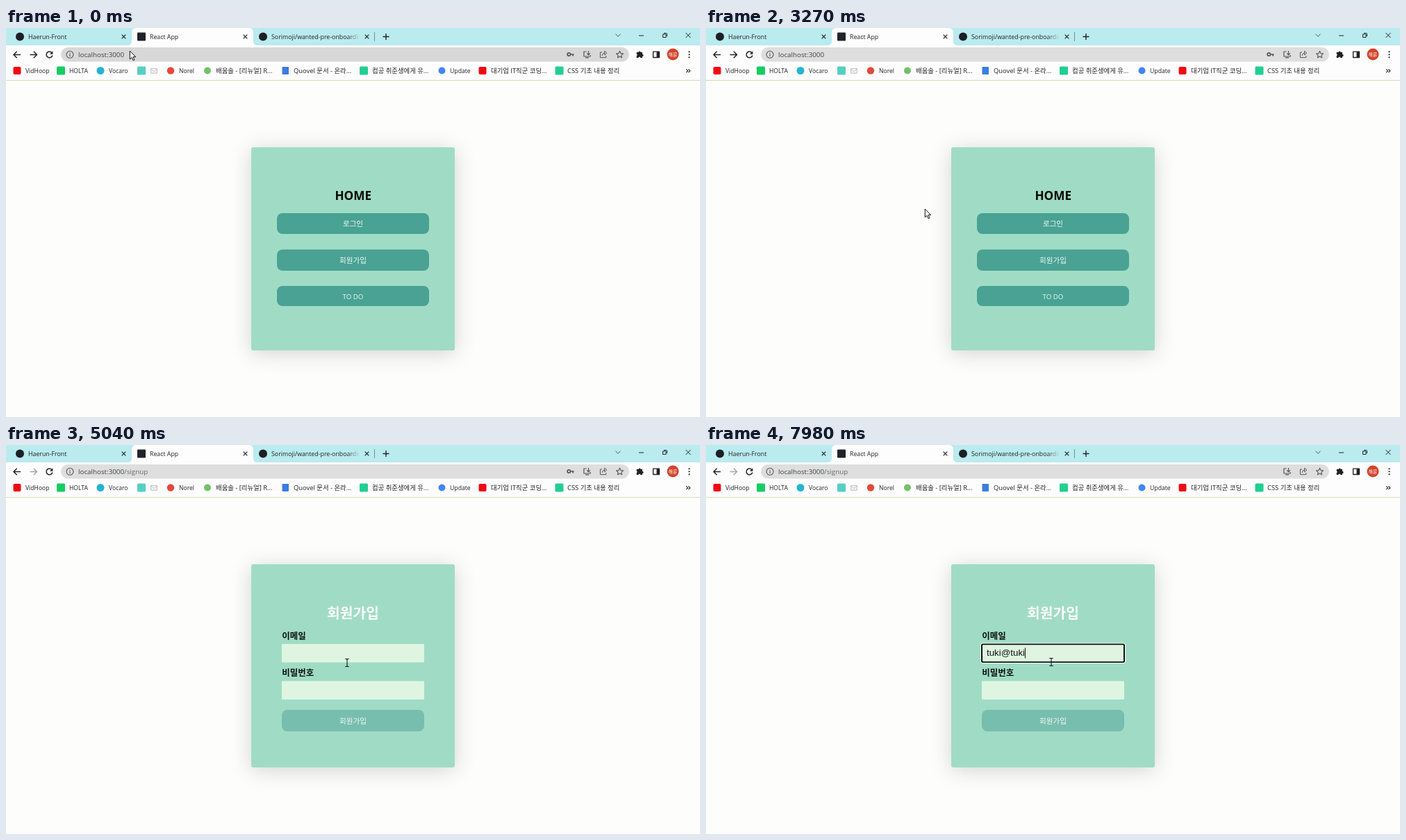
Recreate the animation shown at these times as an HTML page with a canvas. Size 999 by 561 pixels, loop 8000 ms.

```html
<!DOCTYPE html>
<html lang="ko">
<head>
<meta charset="utf-8">
<title>Sign-up flow</title>
<style>
  html, body { margin: 0; width: 100%; height: 100%; overflow: hidden; background: #fdfdfc; }
  canvas { display: block; width: 100vw; height: 100vh; }
</style>
</head>
<body>
<canvas id="stage" width="999" height="561"></canvas>
<script>
const ctx = document.getElementById('stage').getContext('2d');
const LOOP = 8000;
const UI = '"Open Sans", "Noto Sans CJK KR", "Noto Sans CJK", sans-serif';
const KR = '"Noto Sans CJK KR", "Noto Sans CJK", "Open Sans", sans-serif';
const INK = '#222', ICON = '#555';

// Timeline in ms
const SIGNUP_AT = 4810, FOCUS_AT = 5080, KEY_GONE_AT = 6280;
const EMAIL = 'tuki@tuki';
const KEYS = [6560, 6700, 6820, 6940, 7160, 7460, 7580, 7700, 7800];

// Pointer stops: time, x, y
const PATH = [
  [0, 178, 33], [40, 178, 33], [400, 298, 190], [1070, 298, 190], [1100, 300, 192],
  [1540, 300, 192], [1870, 346, 227], [2740, 346, 227], [2810, 314, 260],
  [3240, 314, 260], [3270, 315, 261], [3870, 530, 337], [4040, 530, 337], [4070, 532, 339],
  [4810, 532, 339], [5040, 491, 314], [5180, 497, 313], [8000, 497, 313]
];

const HOME_BUTTONS = [
  { y: 267, h: 30, label: '로그인', size: 10.6 },
  { y: 319.5, h: 30.5, label: '회원가입', size: 10.6 },
  { y: 372, h: 29, label: 'TO DO', size: 9.7 }
];
const FIELDS = [
  { y: 287, label: '이메일', labelY: 279.5 },
  { y: 340.5, label: '비밀번호', labelY: 333.3 }
];

function box(x, y, w, h, color, r = 0) {
  ctx.fillStyle = color;
  ctx.beginPath();
  ctx.roundRect(x, y, w, h, r);
  ctx.fill();
}

function disc(x, y, r, color) {
  ctx.fillStyle = color;
  ctx.beginPath();
  ctx.arc(x, y, r, 0, 7);
  ctx.fill();
}

function text(s, x, y, size, color = INK, { weight = 400, align = 'left', family = UI } = {}) {
  ctx.font = `${weight} ${size}px ${family}`;
  ctx.textAlign = align;
  ctx.fillStyle = color;
  ctx.fillText(s, x, y);
}

// Path given around its own origin, placed at x, y
function shape(d, x, y, { fill, stroke, width = 1.2 }) {
  const p = new Path2D(d);
  ctx.save();
  ctx.translate(x, y);
  ctx.lineJoin = 'round';
  if (fill) { ctx.fillStyle = fill; ctx.fill(p); }
  if (stroke) { ctx.strokeStyle = stroke; ctx.lineWidth = width; ctx.stroke(p); }
  ctx.restore();
}

const cross = (x, y, r, width = 1.2) =>
  shape(`M${-r},${-r}L${r},${r}M${r},${-r}L${-r},${r}`, x, y, { stroke: INK, width });

function tabs() {
  box(0, 0, 999, 25, '#b9ebef');
  box(181, 0, 175, 26, '#fdfdfd', [6, 6, 0, 0]);
  shape('M-6,0Q0,0 0,-6V0Z', 181, 25, { fill: '#fdfdfd' });
  shape('M6,0Q0,0 0,-6V0Z', 356, 25, { fill: '#fdfdfd' });

  disc(20, 12.5, 6, '#1c2024');
  text('Haerun-Front', 32, 15.5, 8.8);
  box(189, 6.5, 12, 12, '#20232a', 1);
  text('React App', 207, 15.5, 8.8);
  disc(370, 12.5, 6, '#1c2024');
  const fade = ctx.createLinearGradient(492, 0, 509, 0);
  fade.addColorStop(0, INK);
  fade.addColorStop(1, '#b9ebef');
  ctx.save();
  ctx.beginPath();
  ctx.rect(380, 0, 129, 25);
  ctx.clip();
  text('Sorimoji/wanted-pre-onboarding', 382, 15.5, 8.8, fade);
  ctx.restore();

  for (const x of [169.5, 344.5, 519.5]) cross(x, 12.5, 2.8);
  box(530, 6, 1, 13, '#6f9498');
  shape('M-4.5,0H4.5M0,-4.5V4.5', 547, 12.5, { stroke: INK, width: 1.4 });

  shape('M-3.5,-1.8L0,1.8L3.5,-1.8', 881, 10.5, { stroke: ICON, width: 1 });
  shape('M-3.5,0H3.5', 914.5, 11, { stroke: INK, width: 1 });
  shape('M-3,-1.5H1.5V3H-3ZM-1.5,-3H2Q3,-3 3,-2V1.5', 948.5, 10.5, { stroke: INK, width: 1 });
  cross(982, 10.5, 3.5, 1);
}

function toolbar(t, hover) {
  const signup = t >= SIGNUP_AT;
  box(0, 25, 999, 50, '#fdfdfd');
  box(0, 75, 999, 1, '#d4d7b2');

  const arrow = 'M-5,0H5M0.3,-4.7L5,0L0.3,4.7';
  shape('M5,0H-5M-0.3,-4.7L-5,0L-0.3,4.7', 16, 38.5, { stroke: INK, width: 1.5 });
  shape(arrow, 39.5, 38.5, { stroke: signup ? '#a4a4a4' : INK, width: 1.5 });
  shape('M3.3,-2.8A4.4,4.4 0 1 0 4.3,1.2', 62.5, 38.3, { stroke: INK, width: 1.5 });
  shape('M4.9,-5V-0.6H0.5Z', 62.5, 38.3, { fill: INK });

  box(79, 28, 818, 20.5, hover ? '#d7d8d7' : '#dddedd', 10.2);
  shape('M5,0A5,5 0 1 1 -5,0A5,5 0 1 1 5,0M0,-0.7V2.7M0,-2.8V-1.6', 92, 38.3, { stroke: ICON, width: 1.1 });
  text('localhost:3000', 104, 41.8, 9.8, '#3f4042');
  if (signup) text('/signup', 104 + ctx.measureText('localhost:3000').width, 41.8, 9.8, '#66686a');

  if (t < KEY_GONE_AT) {
    shape('M0,0A2.2,2.2 0 1 1 -4.4,0A2.2,2.2 0 1 1 0,0M0,0H5M3.6,0V2.6', 812.5, 38, { stroke: ICON, width: 1.7 });
  }
  shape('M-1,-4H-4.6V3H4.6V1M-2.5,4.8H2.5M2,-5V0.5M-0.4,-1.6L2,0.8L4.4,-1.6', 836.5, 38, { stroke: ICON });
  shape('M-2,-3H-4.6V4.6H3.8V2M-2,2Q-1.5,-2 2,-2M1.6,-4.8L4.8,-2L1.6,0.8Z', 860, 38, { stroke: ICON, width: 1 });
  shape('M0,-5L1.5,-1.7L5,-1.4L2.4,1L3.1,4.5L0,2.7L-3.1,4.5L-2.4,1L-5,-1.4L-1.5,-1.7Z', 883.5, 38.3, { stroke: ICON, width: 1.1 });
  shape('M-4.8,-3H-2A1.6,1.6 0 0 1 1.2,-3H3.5V-0.2A1.6,1.6 0 0 1 3.5,3V5H0.8A1.5,1.5 0 0 0 -2.2,5H-4.8V2.2A1.5,1.5 0 0 0 -4.8,-0.6Z', 912.5, 38, { fill: INK });
  shape('M-4.4,-4.2H4.4V4.2H-4.4Z', 936, 38.3, { stroke: INK, width: 1.4 });
  box(936.5, 34, 4, 8.5, INK);
  disc(960, 38, 8.5, '#d3432a');
  text('해룬', 960, 40.6, 6.8, '#fff', { align: 'center', family: KR });
  for (const y of [34, 38, 42]) disc(983.5, y + 0.3, 1.15, INK);
}

function bookmarks() {
  const square = (x, color) => box(x - 6, 55.5, 12, 12, color, 1.5);
  const label = (s, x, size = 8.6) => text(s, x, 64.6, size);
  const wide = 9.4;

  box(10.5, 56, 11, 11, '#f00a14', 2);
  label('VidHoop', 28);
  square(79, '#16cd62');
  label('HOLTA', 91);
  disc(136, 61.5, 5.5, '#25b4d0');
  label('Vocaro', 148);
  square(195, '#56cfc3');
  shape('M-4.5,-3.2H4.5V3.4H-4.5ZM-4.5,-3L0,0.6L4.5,-3', 213, 61.8, { fill: '#f0f0f0', stroke: '#bfc2c4', width: 1 });
  disc(237, 61.5, 5.2, '#e3483b');
  label('Norel', 249);
  disc(290, 61.5, 5, '#73c169');
  label('배움솔 - [리뉴얼] R...', 302, wide);
  box(397.5, 56, 9.5, 11, '#3b7de0', 1);
  label('Quovel 문서 - 온라...', 414, wide);
  square(515, '#22cf91');
  label('컴공 취준생에게 유...', 527, wide);
  disc(627.5, 61.5, 5, '#4285f4');
  label('Update', 639, 8.7);
  box(680.5, 56, 11, 11, '#f00a14', 2);
  label('대기업 IT직군 코딩...', 698, wide);
  square(796.5, '#22cf91');
  label('CSS 기초 내용 정리', 808, wide);
  shape('M-2.8,-2.4L-0.4,0L-2.8,2.4M0.4,-2.4L2.8,0L0.4,2.4', 982, 61.8, { stroke: INK, width: 1.2 });
}

function card() {
  ctx.save();
  ctx.shadowColor = 'rgba(0,0,0,.17)';
  ctx.shadowBlur = 30;
  ctx.shadowOffsetY = 4;
  box(353, 172, 293, 293, '#a0dcc5', 3);
  ctx.restore();
}

function home() {
  text('HOME', 499.8, 247.8, 17.2, '#060808', { weight: 700, align: 'center' });
  for (const b of HOME_BUTTONS) {
    box(390, b.y, 219, b.h, '#49a293', 8);
    text(b.label, 499.5, b.y + b.h / 2 + 4, b.size, '#f4fbf8',
      { align: 'center', family: b.label === 'TO DO' ? UI : KR, weight: 500 });
  }
}

function signup(t) {
  text('회원가입', 499.5, 249.6, 20.4, '#fbfefc', { weight: 700, align: 'center', family: KR });
  for (const f of FIELDS) {
    text(f.label, 397.3, f.labelY, 12.5, '#0c1210', { weight: 700, family: KR });
    box(397, f.y, 205, 26.5, '#dff5e2', 1);
  }
  box(397, 382, 205, 31, '#77beae', 8);
  text('회원가입', 499.5, 401.9, 10.6, '#f4fbf8', { align: 'center', family: KR, weight: 500 });

  if (t < FOCUS_AT) return;
  box(395, 285.5, 209, 29.5, '#fbfefc', 3.5);
  box(396, 286.5, 207, 27.5, '#0b0f0d', 2.5);
  box(398, 288.3, 203, 23.9, '#dff5e2', 1);
  const typed = EMAIL.slice(0, KEYS.filter(k => t >= k).length);
  text(typed, 404, 304.3, 13.33, '#111', { family: '"Liberation Sans", Arial, sans-serif' });
  const caretOn = t < 5580 || t >= 6110;
  if (caretOn) box(404 + ctx.measureText(typed).width, 292.5, 1, 15, '#111');
}

function pointer(t) {
  const i = Math.max(1, PATH.findIndex(p => t < p[0]));
  const [t0, x0, y0] = PATH[i - 1], [t1, x1, y1] = PATH[i];
  const k = (t - t0) / (t1 - t0), e = k * k * (3 - 2 * k);
  return { x: x0 + (x1 - x0) * e, y: y0 + (y1 - y0) * e };
}

function pointerKind(t, { x, y }) {
  const over = (x0, x1, y0, y1) => x >= x0 && x <= x1 && y >= y0 && y <= y1;
  if (t >= 1840 && t < 2760) return 'resize';
  if (t < SIGNUP_AT) return HOME_BUTTONS.some(b => over(390, 609, b.y, b.y + b.h)) ? 'hand' : 'arrow';
  return FIELDS.some(f => over(397, 602, f.y, f.y + 28)) ? 'beam' : 'arrow';
}

const POINTERS = {
  arrow: ['M0,0V12L2.8,9.4L4.8,13.8L6.7,13L4.7,8.7H8.4Z', 1],
  hand: ['M-1.5,1Q0,-1 1.5,1V5L6.3,6.2Q8,7 7.8,9.5L7,13L6,16.2H-0.3L-3.9,10.8Q-4.6,8.4 -2.8,8.8L-1.5,10Z', 1.1],
  resize: ['M-8,0L-4,-3.8V-1.3H4V-3.8L8,0L4,3.8V1.3H-4V3.8Z', 1]
};

function drawPointer(kind, { x, y }) {
  if (kind === 'beam') {
    shape('M-2.8,-5.5H-0.8L0,-4.8L0.8,-5.5H2.8M0,-5V5M-2.8,5.5H-0.8L0,4.8L0.8,5.5H2.8', x, y, { stroke: '#161a18', width: 1.1 });
    return;
  }
  const [d, width] = POINTERS[kind];
  shape(d, x + 0.3, y, { fill: '#fff', stroke: '#111', width });
}

function draw(t) {
  const at = pointer(t);
  box(0, 0, 999, 561, '#fdfdfc');
  tabs();
  toolbar(t, at.y > 28 && at.y < 48);
  bookmarks();
  card();
  if (t < SIGNUP_AT) home(); else signup(t);
  drawPointer(pointerKind(t, at), at);
}

const start = performance.now();
function tick() {
  draw((performance.now() - start) % LOOP);
  requestAnimationFrame(tick);
}
tick();
</script>
</body>
</html>
```
